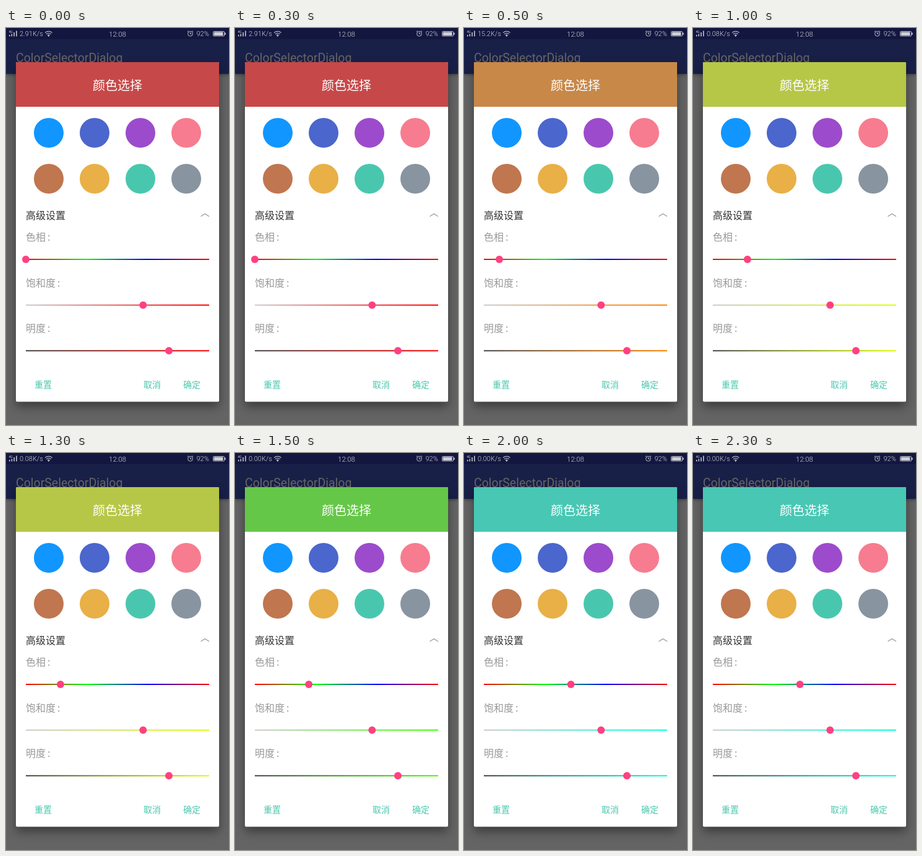
These frames come from a looping animation (360x640 px, 2500 ms). An HTML page:

```html
<!DOCTYPE html>
<html lang="zh-CN">
<head>
<meta charset="utf-8">
<title>颜色选择</title>
<style>
html, body { margin: 0; width: 100%; height: 100%; overflow: hidden; background: #646464; }

.stage {
  display: block;
  width: 360px;
  height: 640px;
  font-family: "Noto Sans CJK SC", "Noto Sans CJK", sans-serif;
  animation: hue 2.5s step-end infinite;
  --hue: 0;
  --pure: hsl(var(--hue) 100% 50%);
}
@keyframes hue {
  0%   { --hue: 0;    --pure: hsl(0 100% 50%); }
  20%  { --hue: 30.4; --pure: hsl(30.4 100% 50%); }
  40%  { --hue: 68;   --pure: hsl(68 100% 50%); }
  60%  { --hue: 106;  --pure: hsl(106 100% 50%); }
  80%, 100% { --hue: 171; --pure: hsl(171 100% 50%); }
}

.header { fill: hsl(var(--hue) 53% 53%); }
.pure { stop-color: var(--pure); }
.hue-thumb { transform: translateX(calc(var(--hue) / 360 * 296px)); }

.speed { animation: speed 2.5s steps(5) infinite; }
@keyframes speed { to { transform: translateY(-100px); } }

.bar { filter: drop-shadow(0 2px 2px rgba(0, 0, 0, .3)); }
.dialog { filter: drop-shadow(0 8px 8px rgba(0, 0, 0, .4)); }
.latin { font-family: Roboto, sans-serif; }
.status { font-size: 11px; font-weight: 300; fill: #d0d0d8; }
.icon { fill: none; stroke: #d0d0d8; }
.label { font-size: 16px; fill: #999; }
.action { font-size: 14px; fill: #49c7ae; }
.thumb { fill: #ff4081; }
</style>
</head>
<body>
<svg class="stage" viewBox="0 0 360 640">
  <defs>
    <linearGradient id="hues">
      <stop stop-color="#f00"/>
      <stop offset=".3333" stop-color="#0f0"/>
      <stop offset=".6667" stop-color="#00f"/>
      <stop offset="1" stop-color="#f00"/>
    </linearGradient>
    <linearGradient id="saturation">
      <stop stop-color="#ccc"/>
      <stop offset="1" class="pure"/>
    </linearGradient>
    <linearGradient id="brightness">
      <stop stop-color="#444"/>
      <stop offset="1" class="pure"/>
    </linearGradient>
  </defs>

  <!-- Dimmed activity -->
  <rect width="360" height="640" fill="#646464"/>
  <rect class="bar" width="360" height="74" fill="#192048"/>
  <rect width="360" height="18" fill="#131740"/>
  <text class="latin" x="16" y="54.5" font-size="19.5" fill="#666">ColorSelectorDialog</text>

  <!-- Status bar -->
  <g class="latin status">
    <text x="4.5" y="8" font-size="5" font-weight="400">4G</text>
    <path d="M5 11h1.5v2.5H5zM8.6 9.5h1.5v4H8.6zM12.4 7h1.5v6.5h-1.5zM16.2 4.5h1.5v9h-1.5z"/>
    <svg x="22" y="0" width="41" height="18">
      <g class="speed">
        <text y="13.3">2.91K/s</text>
        <text y="33.3">15.2K/s</text>
        <text y="53.3">0.08K/s</text>
        <text y="73.3">0.00K/s</text>
        <text y="93.3">0.00K/s</text>
      </g>
    </svg>
    <text x="180" y="13.5" font-size="11.5" text-anchor="middle">12:08</text>
    <text x="307.5" y="13.3">92%</text>
    <path class="icon" stroke-width="1.1" d="M63 7.6q5.8-4.6 11.6 0M65 9.8q3.8-3 7.6 0M66.9 11.8q1.9-1.4 3.8 0"/>
    <circle cx="68.8" cy="13" r=".9"/>
    <g class="icon" stroke-width=".9">
      <circle cx="297.5" cy="9.3" r="3.9"/>
      <path d="M297.5 7v2.5h2M292.8 6.2l2-1.8M302.2 6.2l-2-1.8"/>
      <rect x="334.5" y="5.5" width="18" height="7.5" rx="1"/>
    </g>
    <path d="M335.6 6.6h14.8v5.3h-14.8zM353.2 7.6h1.4v3.3h-1.4z"/>
  </g>

  <!-- Dialog -->
  <rect class="dialog" x="16" y="55" width="328" height="547.5" rx="2" fill="#fff"/>
  <path class="header" d="M16 127V57a2 2 0 0 1 2-2h324a2 2 0 0 1 2 2v70z"/>
  <text x="180" y="99.5" font-size="20" text-anchor="middle" fill="#fff">颜色选择</text>

  <circle cx="69" cy="169" r="24" fill="#1196ff"/>
  <circle cx="143" cy="169" r="24" fill="#4b66cc"/>
  <circle cx="217" cy="169" r="24" fill="#9c4bcc"/>
  <circle cx="291" cy="169" r="24" fill="#f77c8f"/>
  <circle cx="69" cy="243" r="24" fill="#c0764f"/>
  <circle cx="143" cy="243" r="24" fill="#e8b046"/>
  <circle cx="217" cy="243" r="24" fill="#49c7ae"/>
  <circle cx="291" cy="243" r="24" fill="#8894a0"/>

  <text x="32" y="307.7" font-size="16" fill="#333">高级设置</text>
  <path d="M314.5 303.7l6.7-4.2 6.7 4.2" fill="none" stroke="#999" stroke-width="1.3"/>

  <text class="label" x="32" y="343.2">色相<tspan dx="3">:</tspan></text>
  <rect x="32" y="372" width="296" height="2" fill="url(#hues)"/>
  <circle class="thumb hue-thumb" cx="32" cy="373" r="6"/>

  <text class="label" x="32" y="416.7">饱和度<tspan dx="3">:</tspan></text>
  <rect x="32" y="445.7" width="296" height="2" fill="url(#saturation)"/>
  <circle class="thumb" cx="221.3" cy="446.7" r="6"/>

  <text class="label" x="32" y="490.3">明度<tspan dx="3">:</tspan></text>
  <rect x="32" y="519.3" width="296" height="2" fill="url(#brightness)"/>
  <circle class="thumb" cx="263" cy="520.3" r="6"/>

  <g class="action">
    <text x="46" y="580.2">重置</text>
    <text x="222" y="580.2">取消</text>
    <text x="286" y="580.2">确定</text>
  </g>
</svg>
</body>
</html>
```
